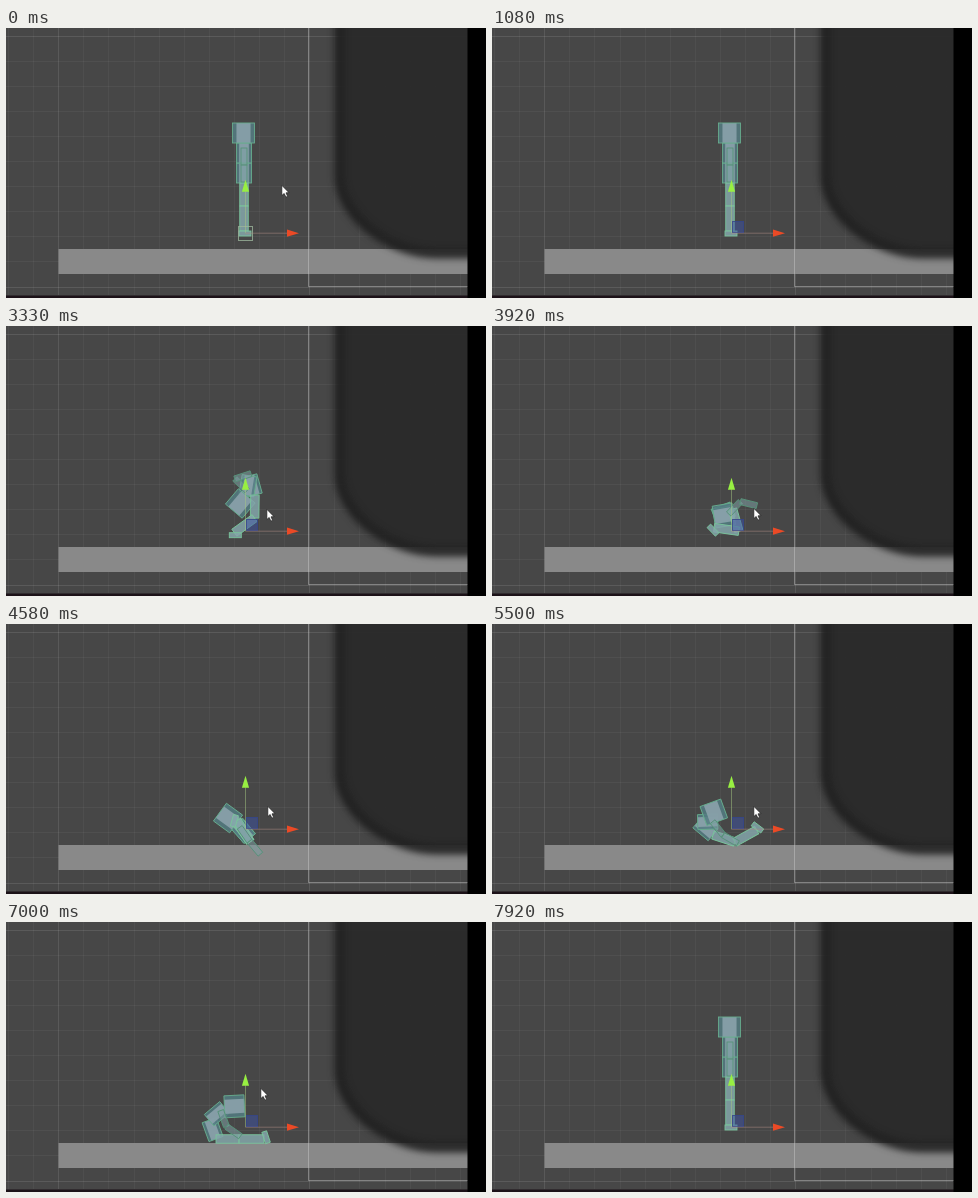
These frames come from a looping animation (480 by 270 pixels, 8000 ms). An HTML page with a canvas:

```html
<!DOCTYPE html>
<html lang="en">
<head>
<meta charset="utf-8">
<title>Ragdoll</title>
<style>
  html, body { margin: 0; width: 100%; height: 100%; overflow: hidden; background: #000; }
  canvas { display: block; }
</style>
</head>
<body>
<canvas id="stage" width="480" height="270"></canvas>
<script>
const LOOP = 8000, STEP = 1000 / 12;
const PLAY_AT = 740, RESET_AT = 7740;
const ctx = document.getElementById('stage').getContext('2d');

const linear = p => p;
const fall = p => p ** 1.6;
const settle = p => 1 - (1 - p) ** 2;

// Angles in degrees, clockwise from upright. spine: belly, chest, head; arm: upper, fore; leg: thigh, shin.
const STAND = { hip: [238, 155], spine: [0, 0, 0], arm: [0, 0], leg: [0, 0] };
const CROUCH = { hip: [249, 169], spine: [-15, -170, -140], arm: [133, 252], leg: [1, 54] };
const PILE = { hip: [231, 199], spine: [-220, -402, -54], arm: [325, 320], leg: [-35, 148] };
const KICK = { hip: [221, 211], spine: [-50, -272, -20], arm: [322, 300], leg: [-72, 241] };
const SIT = { hip: [210, 217], spine: [-20, -310, 87], arm: [340, 305], leg: [-90, 270] };

const MOVES = [
  { from: STAND, to: CROUCH, start: 2660, end: 3330, ease: fall },
  { from: CROUCH, to: PILE, start: 3330, end: 4580, ease: linear },
  { from: PILE, to: KICK, start: 4580, end: 5500, ease: linear },
  { from: KICK, to: SIT, start: 5500, end: 6900, ease: settle }
];

// The pointer leaves for the play button, comes back, rests, and leaves again.
const POINTER = [
  { t: 0, x: 276, y: 157 }, { t: 700, x: 370, y: -16 },
  { t: 1180, x: 250, y: -16 }, { t: 1580, x: 255, y: 199 },
  { t: 2580, x: 258, y: 186 }, { t: 3580, x: 262, y: 182 },
  { t: 6500, x: 262, y: 182 }, { t: 7000, x: 255, y: 166 }, { t: 7420, x: 250, y: -16 }
];

const mix = (a, b, p) => a + (b - a) * p;
const mixAll = (a, b, p) => a.map((v, i) => mix(v, b[i], p));
const progress = (t, start, end) => Math.min(1, Math.max(0, (t - start) / (end - start)));

function poseAt(t) {
  if (t >= RESET_AT) return STAND;
  const { from, to, start, end, ease } = MOVES.find(m => t < m.end) || MOVES[MOVES.length - 1];
  const p = ease(progress(t, start, end));
  return Object.fromEntries(Object.keys(from).map(k => [k, mixAll(from[k], to[k], p)]));
}

function pointerAt(t) {
  const next = POINTER.findIndex(k => k.t > t);
  if (next < 0) return POINTER[POINTER.length - 1];
  const a = POINTER[next - 1], b = POINTER[next], p = progress(t, a.t, b.t);
  return { x: mix(a.x, b.x, p), y: mix(a.y, b.y, p) };
}

function line(c, color, x1, y1, x2, y2) {
  c.strokeStyle = color;
  c.lineWidth = 1;
  c.beginPath();
  c.moveTo(x1, y1);
  c.lineTo(x2, y2);
  c.stroke();
}

function makeBackdrop() {
  const canvas = document.createElement('canvas');
  canvas.width = 480;
  canvas.height = 270;
  const c = canvas.getContext('2d');
  c.fillStyle = '#474747';
  c.fillRect(0, 0, 480, 270);

  const shade = major => `rgba(255,255,255,${major ? 0.1 : 0.045})`;
  for (let i = 0; i < 19; i++) {
    const x = Math.round(2 + i * 25.1) + 0.5;
    line(c, shade(i % 10 === 2), x, 0, x, 267);
    const y = Math.round(8 + i * 25.05) + 0.5;
    line(c, shade(i % 10 === 0), 0, y, 461, y);
  }
  c.fillStyle = '#898989';
  c.fillRect(52.5, 221, 410, 25);

  const panel = new Path2D('M333 -30V150C335 190 385 226 430 226H520V-30Z');
  c.filter = 'blur(3.5px)';
  c.fillStyle = 'rgba(43,43,43,.97)';
  c.fill(panel);
  c.strokeStyle = 'rgba(24,24,24,.75)';
  c.lineWidth = 9;
  c.stroke(panel);
  c.filter = 'none';

  const frame = 'rgba(205,205,205,.45)';
  line(c, frame, 302.5, 0, 302.5, 258.5);
  line(c, frame, 302.5, 258.5, 462, 258.5);
  c.fillStyle = '#1c1218';
  c.fillRect(0, 267.5, 480, 3);
  c.fillStyle = '#000';
  c.fillRect(461.5, 0, 19, 270);
  return canvas;
}

const BODY = { fill: 'rgba(84,124,130,.85)', core: 'rgba(142,165,174,.85)', stroke: '#66ac8d' };
const LIMB = { fill: 'rgba(132,166,170,.85)', stroke: '#79c49b' };
const ARM = { fill: 'rgba(125,158,162,.55)', stroke: '#579279' };

function along([x, y], degrees, distance) {
  const a = degrees * Math.PI / 180;
  return [x - Math.sin(a) * distance, y + Math.cos(a) * distance];
}

// A bone hangs below its joint, or rises above it if its length is negative. Returns the far joint.
function bone(joint, degrees, width, length, look, shift = 0) {
  const x = shift - width / 2, side = width * 0.18;
  ctx.save();
  ctx.translate(...joint);
  ctx.rotate(degrees * Math.PI / 180);
  ctx.fillStyle = look.fill;
  ctx.fillRect(x, 0, width, length);
  if (look.core) {
    ctx.fillStyle = look.core;
    ctx.fillRect(x + side, 0, width - 2 * side, length);
  }
  ctx.strokeStyle = look.stroke;
  ctx.lineWidth = 0.9;
  ctx.strokeRect(x, 0, width, length);
  ctx.restore();
  return along(joint, degrees, length);
}

function drawDoll({ hip, spine: [belly, chest, head], arm: [upper, fore], leg: [thigh, shin] }) {
  const waist = bone(hip, belly, 15, -20, BODY);
  const neck = bone(waist, chest, 15, -20, BODY);
  bone(neck, head, 22, -20, BODY, -0.5);

  const knee = bone(hip, thigh, 8.5, 23, LIMB);
  const ankle = bone(knee, shin, 8.5, 25, LIMB);
  // The foot stays flat until the shin has tipped far enough to lift it.
  bone(ankle, Math.max(0, shin - 60) * 1.2, 12, 5, LIMB, 1);

  const elbow = bone(along(neck, chest, 5), upper, 6, 17, ARM);
  bone(elbow, fore, 6, 17, ARM);
}

function drawArrow(x, y, turns, color, shaft) {
  ctx.save();
  ctx.translate(x, y);
  ctx.rotate(turns * 2 * Math.PI);
  line(ctx, shaft, 0, -42, 0, 0);
  ctx.fillStyle = color;
  ctx.beginPath();
  ctx.moveTo(0, -53.5);
  ctx.lineTo(3.6, -41.5);
  ctx.lineTo(-3.6, -41.5);
  ctx.fill();
  ctx.restore();
}

function drawSquare(x, y, w, h, fill, stroke) {
  ctx.fillStyle = fill;
  ctx.fillRect(x, y, w, h);
  ctx.strokeStyle = stroke;
  ctx.lineWidth = 1;
  ctx.strokeRect(x + 0.5, y + 0.5, w - 1, h - 1);
}

function drawGizmo(playing) {
  if (playing) drawSquare(240, 193, 12, 12, 'rgba(60,82,165,.5)', 'rgba(52,68,135,.75)');
  else drawSquare(232, 198, 15, 15, 'transparent', 'rgba(155,180,155,.8)');
  drawArrow(239.5, 205.2, 0, '#98ef42', 'rgba(165,200,130,.5)');
  drawArrow(239.5, 205.2, 0.25, '#eb4a26', 'rgba(175,140,132,.5)');
}

const ARROW = new Path2D('M0 0V9.5L2.2 7.6L3.8 11L5.4 10.2L3.9 7L6.7 6.8Z');

function drawPointer({ x, y }) {
  ctx.save();
  ctx.translate(x - 0.2, y + 0.3);
  ctx.scale(1.08, 1.08);
  ctx.fillStyle = '#fff';
  ctx.fill(ARROW);
  ctx.strokeStyle = '#222';
  ctx.lineWidth = 0.7;
  ctx.stroke(ARROW);
  ctx.restore();
}

const backdrop = makeBackdrop();
const begin = performance.now();

function draw() {
  const time = (performance.now() - begin) % LOOP;
  const t = Math.floor(time / STEP + 0.05) * STEP;
  ctx.drawImage(backdrop, 0, 0);
  drawDoll(poseAt(t));
  drawGizmo(t >= PLAY_AT);
  drawPointer(pointerAt(t));
  requestAnimationFrame(draw);
}
draw();
</script>
</body>
</html>
```
